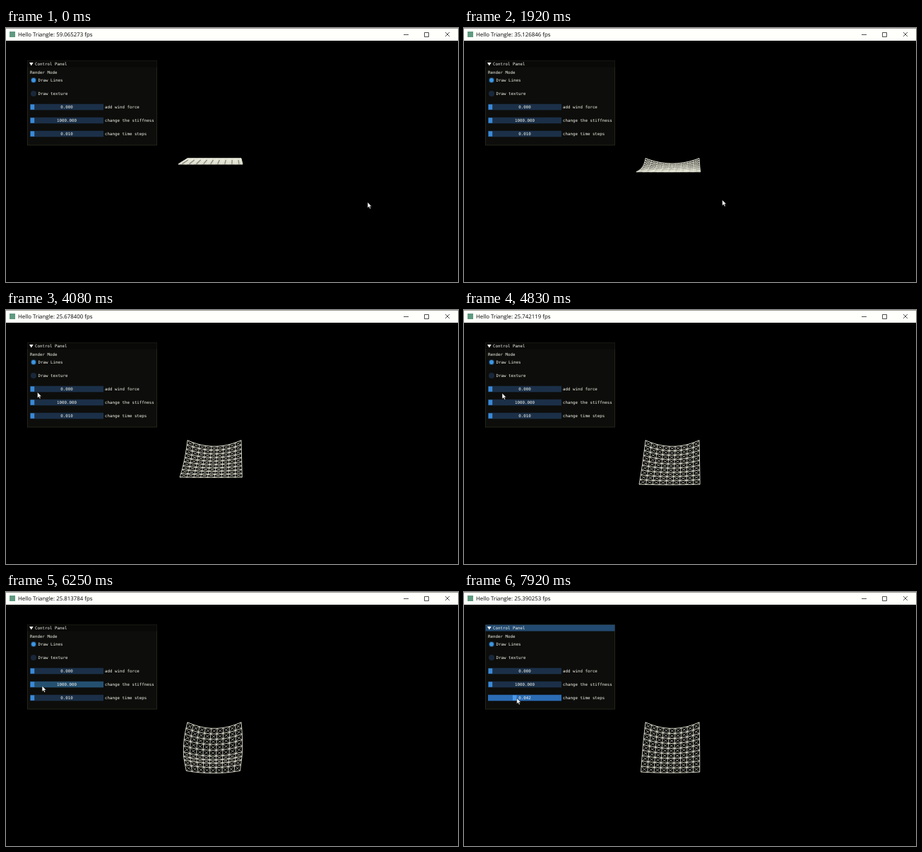
An HTML page for the animation above (8 s loop, 640 by 360 pixels).

```html
<!DOCTYPE html>
<html lang="en">
<head>
<meta charset="utf-8">
<title>Cloth simulation</title>
<style>
  html, body { margin: 0; width: 100%; height: 100%; overflow: hidden; background: #000; }
  svg { display: block; width: 100vw; height: 100vh; text-rendering: geometricPrecision; }
  .title { font: 7.87px "Open Sans", "Noto Sans", sans-serif; fill: #000; }
  .ui { font: 5.81px "DejaVu Sans Mono", "Liberation Mono", monospace; fill: #f4f4ec; }
  .value { text-anchor: middle; }
  .line { fill: none; stroke-linejoin: round; }
</style>
</head>
<body>
<svg viewBox="0 0 640 360">
  <rect width="640" height="360"/>
  <rect width="640" height="18" fill="#fffffc"/>
  <rect width="640" height="1" fill="#9a9a92"/>
  <rect x="5" y="5" width="8" height="8" fill="#5f9a80"/>
  <text class="title" x="17" y="12" id="fps"></text>
  <path class="line" stroke="#222" stroke-width=".8" d="M563 9.5h7M592.5 6.5h6v6h-6zM622 6l6 6M628 6l-6 6"/>

  <path class="line" id="diagonals" stroke="#d0d0c2" stroke-width=".65"/>
  <path class="line" id="threads" stroke="#f2f2e2" stroke-width=".85"/>
  <path class="line" id="gaps" stroke="#56564e" stroke-width="1.4"/>

  <rect x="30.5" y="46.5" width="183" height="119.5" fill="#0d0d0b" stroke="#2c2c20" stroke-width=".8"/>
  <rect x="30.5" y="46.5" width="183" height="9" id="header"/>
  <path d="M33 49h5.6l-2.8 4.4z" fill="#fff"/>
  <g class="ui">
    <text x="41" y="53">Control Panel</text>
    <text x="34" y="64.7">Render Mode</text>
    <text x="45.5" y="76">Draw Lines</text>
    <text x="45.5" y="95">Draw texture</text>
  </g>
  <circle cx="39" cy="74" r="4.1" fill="#1c3450"/>
  <circle cx="39" cy="74" r="2.9" fill="#3c98e4"/>
  <circle cx="39" cy="93" r="4.1" fill="#18283a"/>
  <g id="sliders" class="ui"></g>
  <path id="cursor" d="M0 0v8l1.9-1.7 1.3 2.9 1.3-.6-1.3-2.8h2.5z" fill="#fff" stroke="#000" stroke-width=".4"/>
</svg>
<script>
const LOOP = 8000, STEP = 1000 / 12, CELLS = 9;
const FALL_TIME = 6200, TUCK_START = 4700, TUCK_TIME = 3600, DRAG_START = 7400;
const TOP = { left: 257, right: 333, y: 184.7 };
const GRAB_REST = 37.4, GRAB_TRAVEL = 97.2;
const $ = id => document.getElementById(id);
const clamp = p => Math.max(0, Math.min(1, p));
const smooth = p => p * p * (3 - 2 * p);

// The pointer's stops; a higher power makes the sideways move into a stop quicker at first.
const stops = [
  { t: 1750, x: 512, y: 247 },
  { t: 2920, x: 209.5, y: 187, power: 4.3 },
  { t: 4080, x: 44.5, y: 116.6, power: 1.5 },
  { t: 5500, x: 62.5, y: 119, power: 1 },
  { t: 7080, x: 38.5, y: 149.5, power: 1 },
  { t: DRAG_START, x: 38.5, y: 149.5, power: 1 },
  { t: 7920, x: 75, y: 150.5, power: 1 }
];

// The reading is renewed about once a second.
const rates = ["59.065273", "41.382917", "35.126846", "25.661036", "25.678400",
  "25.742119", "25.813784", "25.866512", "25.390253"];

function pointerAt(t) {
  const next = Math.max(1, stops.findIndex(s => s.t > t));
  const a = stops[next - 1], b = stops[next];
  const p = clamp((t - a.t) / (b.t - a.t));
  return [a.x + (b.x - a.x) * (1 - (1 - p) ** b.power), a.y + (b.y - a.y) * smooth(p)];
}

const bend = (a, b, c, v) => a * (1 - v) ** 2 + 2 * b * v * (1 - v) + c * v * v;

// The sheet falls from level to upright, then its lower edge tucks in and swings back.
function clothAt(t) {
  const fall = Math.sin(Math.PI / 2 * clamp(t / FALL_TIME)) ** 2.3;
  const tuck = Math.sin(Math.PI * clamp((t - TUCK_START) / TUCK_TIME)) ** 2;
  const slack = Math.sin(Math.PI * Math.sqrt(fall));
  const left = 244 + 6 * fall ** 3 + 5.5 * tuck;
  const right = 335 - fall - 2.7 * tuck;
  const bottom = 193 + 62.3 * fall - 2 * tuck;
  const bendLeft = (TOP.left + left) / 2 + 4.5 * slack - 10 * tuck;
  const bendRight = (TOP.right + right) / 2 + 5 * tuck;
  const bendY = (TOP.y + bottom) / 2 + 5.5 * slack + 4 * tuck;
  const topSag = 8.7 * (1 - Math.exp(-t / 1000));
  const bottomSag = fall ** 3 + 2.5 * tuck;

  return (u, v) => {
    const x0 = bend(TOP.left, bendLeft, left, v), x1 = bend(TOP.right, bendRight, right, v);
    const sag = (topSag * (1 - v) + bottomSag * v) * 4 * u * (1 - u);
    const crease = v > .4 ? 2 * tuck * Math.sin((v - .4) / .6 * 2 * Math.PI) : 0;
    const y = bend(TOP.y, bendY, bottom, v) + sag + crease;
    return (x0 + (x1 - x0) * u).toFixed(2) + " " + y.toFixed(2);
  };
}

function drawCloth(t) {
  const point = clothAt(t);
  const node = (c, r) => point(c / CELLS, r / CELLS);
  const steps = [...Array(CELLS + 1).keys()];
  let threads = "", diagonals = "", gaps = "";
  for (const i of steps) {
    threads += "M" + steps.map(c => node(c, i)).join("L");
    threads += "M" + steps.map(r => node(i, r)).join("L");
    if (i === CELLS) continue;
    gaps += `M${node(i + .5, 2.5)}L${node(i + .5, 8.6)}`;
    for (let r = 0; r < CELLS; r++)
      diagonals += `M${node(i, r)}L${node(i + 1, r + 1)}M${node(i + 1, r)}L${node(i, r + 1)}`;
  }
  $("threads").setAttribute("d", threads);
  $("diagonals").setAttribute("d", diagonals);
  $("gaps").setAttribute("d", gaps);
  $("gaps").setAttribute("opacity", .6 * clamp(1 - t / 2600));
}

function add(parent, tag, attrs, text = "") {
  const el = document.createElementNS(parent.namespaceURI, tag);
  for (const name in attrs) el.setAttribute(name, attrs[name]);
  el.textContent = text;
  return parent.appendChild(el);
}

const sliders = [
  ["0.000", "add wind force"], ["1000.000", "change the stiffness"], ["0.010", "change time steps"]
].map(([value, label], i) => {
  const y = 107.7 + 19 * i, parent = $("sliders");
  const frame = add(parent, "rect", { x: 34, y, width: 104, height: 8.6 });
  const grab = add(parent, "rect", { x: GRAB_REST - 2.8, y: y + .6, width: 5.6, height: 7.4, fill: "#3a8ad8" });
  const text = add(parent, "text", { class: "value", x: 86, y: y + 6.3 }, value);
  add(parent, "text", { x: 140, y: y + 6.3 }, label);
  return { y, frame, grab, text };
});

function drawPanel(t, x, y) {
  const dragging = t >= DRAG_START;
  $("header").setAttribute("fill", dragging ? "#234a70" : "#090908");
  sliders.forEach((s, i) => {
    const hover = !dragging && x >= 34 && x <= 138 && y >= s.y && y <= s.y + 8.6;
    const active = dragging && i === 2;
    s.frame.setAttribute("fill", active ? "#2b6cb4" : hover ? "#245070" : "#1b3048");
  });
  const { grab, text } = sliders[2];
  const center = dragging ? Math.max(GRAB_REST, x - 3) : GRAB_REST;
  grab.setAttribute("x", center - 2.8);
  grab.setAttribute("fill", dragging ? "#4a98ea" : "#3a8ad8");
  text.textContent = (.01 + .09 * (center - GRAB_REST) / GRAB_TRAVEL).toFixed(3);
}

function draw(time) {
  const t = Math.floor(time / STEP + .06) * STEP % LOOP;
  const [x, y] = pointerAt(t);
  $("fps").textContent = `Hello Triangle: ${rates[Math.floor((t + 580) / 1000)]} fps`;
  $("cursor").setAttribute("transform", `translate(${x} ${y})`);
  drawCloth(t);
  drawPanel(t, x, y);
}

const start = performance.now();
function tick() {
  draw((performance.now() - start) % LOOP);
  requestAnimationFrame(tick);
}
tick();
</script>
</body>
</html>
```
